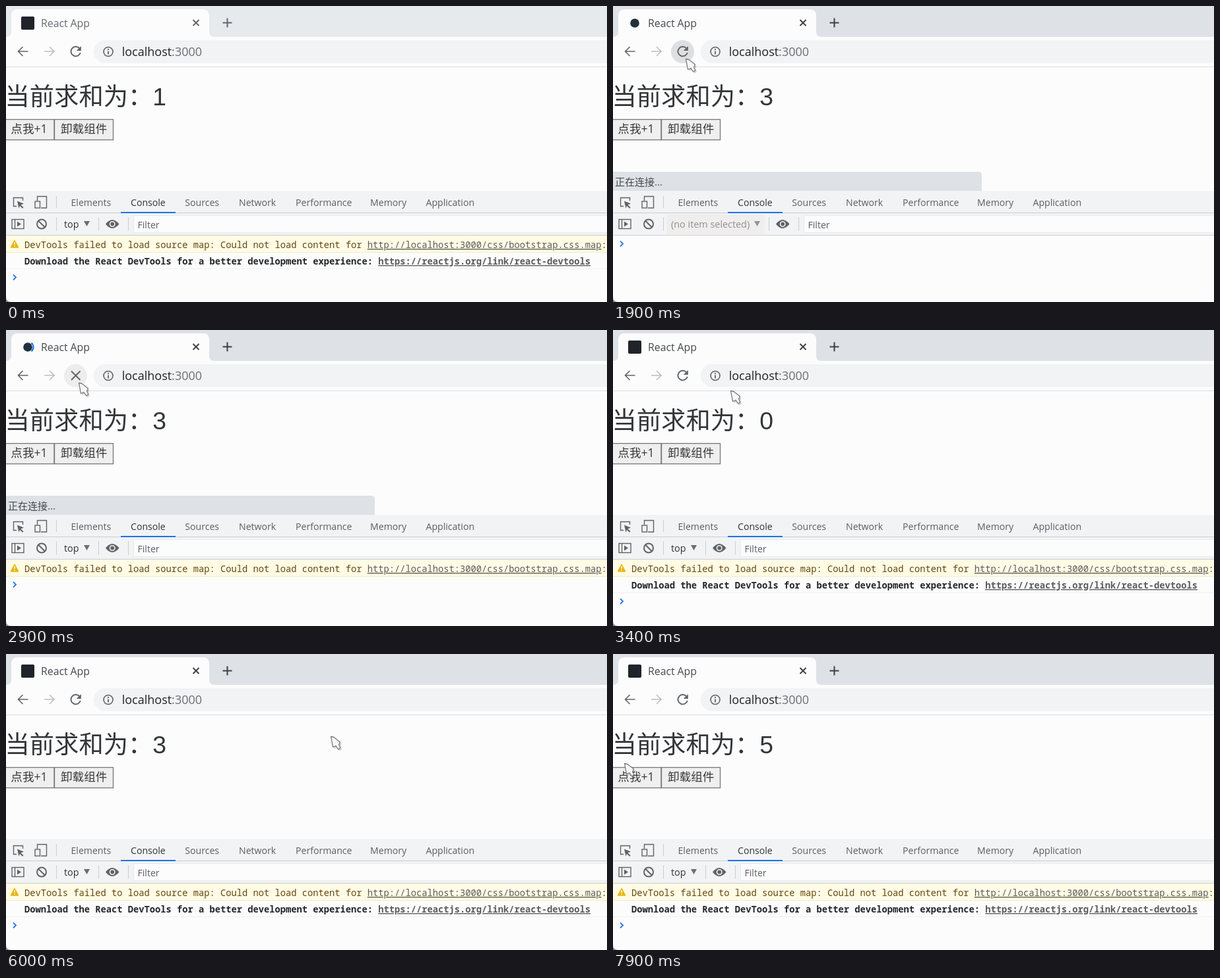
An HTML page for the animation above (8000 ms loop, 911 by 450 pixels).

```html
<!DOCTYPE html>
<html lang="zh">
<head>
<meta charset="utf-8">
<title>React App</title>
<style>
  html, body { margin: 0; width: 100%; height: 100%; overflow: hidden; background: #fcfcfc; }
  svg { display: block; width: 911px; height: 450px; }
  text { font-family: "Open Sans", "Noto Sans", "Noto Sans CJK SC", sans-serif; white-space: pre; }
  .zh { font-family: "Noto Sans CJK SC", "Noto Sans CJK", sans-serif; }
  .sum { font: 37.3px "Liberation Sans", "Noto Sans CJK SC", "Noto Sans CJK", sans-serif; fill: #333639; }
  .btn { fill: #efefef; stroke: #767676; stroke-width: 1.3; }
  .btnText { font-size: 17.6px; fill: #383838; }
  .mono { font: 13.75px "Noto Sans Mono", "DejaVu Sans Mono", monospace; }
  .bold { font-weight: 700; }
  .link { text-decoration: underline 1px; fill: #5c5c5c; }
  .ui { font-size: 14.1px; fill: #5a5e63; }
  .line { fill: none; stroke: #5f6368; stroke-width: 1.6; }
  .sep { stroke: #cbced2; }
</style>
</head>
<body>
<svg viewBox="0 0 911 450">
  <rect width="911" height="450" fill="#fcfcfc"/>

  <!-- tab strip -->
  <rect id="strip" width="911" height="47"/>
  <path d="M0 47Q8 47 8 39V15Q8 5 18 5H298Q308 5 308 15V39Q308 47 316 47Z" fill="#fcfcfc"/>
  <rect id="icon" x="23" y="16" width="20" height="20" rx="2" fill="#20232a"/>
  <g id="busyIcon">
    <circle cx="33" cy="26" r="6.8" fill="#20303c"/>
    <path id="spinner" d="M38.5 19.5A8.5 8.5 0 0 1 38.5 32.5" fill="none" stroke="#1a6fe0" stroke-width="2"/>
  </g>
  <g id="tabInk">
    <text x="53" y="32" font-size="15.8">React App</text>
    <path id="tabMarks" d="M283.5 21l9 9m0-9l-9 9M328.5 25.5h14m-7-7v14" fill="none" stroke-width="2"/>
  </g>

  <!-- address bar -->
  <path d="M0 92.5H911" stroke="#dcdee0"/>
  <g class="line" stroke-width="1.9">
    <path d="M33.5 69H18.5m7-7l-7 7 7 7"/>
    <path d="M58 69H73m-7-7l7 7-7 7" style="stroke:#bbbdc0"/>
  </g>
  <circle id="halo" cx="105.5" cy="69.5" r="17.5"/>
  <g id="reload">
    <path class="line" style="stroke-width:1.9" d="M111 64A7.3 7.3 0 1 0 112.8 71"/>
    <path d="M113.8 61V68H106.8Z" fill="#5f6368"/>
  </g>
  <path id="stop" class="line" style="stroke-width:2" d="M99 62.5l13.5 13.5m0-13.5l-13.5 13.5"/>
  <path d="M911 52H150a17.25 17.25 0 0 0 0 34.5H911Z" fill="#f1f3f4"/>
  <circle class="line" cx="155" cy="69.5" r="7"/>
  <path class="line" style="stroke-width:1.8" d="M155 68.5v5m0-8.5v2"/>
  <text x="175.7" y="76" font-size="18" fill="#202124">localhost<tspan fill="#6b6f74">:3000</tspan></text>

  <!-- page -->
  <text class="sum" x="-1.5" y="150.8">当前求和为：<tspan id="count"></tspan></text>
  <rect class="btn" x="-1" y="172.5" width="74" height="31"/>
  <rect class="btn" x="73.5" y="172.5" width="89" height="31"/>
  <text class="btnText" x="7.3" y="193">点我+1</text>
  <text class="btnText zh" x="83" y="193">卸载组件</text>
  <g id="status">
    <path d="M0 252H554q5 0 5 5V281H0Z" fill="#dee1e6"/>
    <text x="3" y="273" font-size="15" fill="#45494d">正在连接...</text>
  </g>

  <!-- developer tools -->
  <rect y="281" width="911" height="68" fill="#f1f3f4"/>
  <path class="sep" d="M0 314.5H911M0 348.5H911M76.5 289v18M76.5 321v21"/>
  <g id="tabs" class="ui"></g>
  <rect x="174" y="313" width="83" height="2" fill="#1a73e8"/>
  <g class="line" style="stroke-width:1.4">
    <path d="M16 304.5H11.5V291.5H25.5V296"/>
    <path d="M17 296.5l10 4-4.5 1.8 4 4-1.5 1.5-4-4-1.5 4Z" fill="#5f6368" stroke="none"/>
    <path d="M47.5 296V289.5H61.5V307H53"/>
    <rect x="44" y="297" width="7.5" height="10"/>
    <rect x="9" y="324.5" width="18" height="14"/>
    <path d="M13.5 324.5v14"/>
    <path d="M17 327.5l6 4-6 4Z" fill="#5f6368" stroke="none"/>
    <circle cx="54" cy="331.5" r="7" stroke-width="2"/>
    <path d="M49 326.5l10 10" stroke-width="2"/>
  </g>
  <rect id="noItem" x="82" y="317" width="147" height="30" fill="#f0eded"/>
  <text id="context" x="88" y="337" font-size="14.4"></text>
  <path id="caret" d="M0 327h9l-4.5 8Z"/>
  <g id="tools">
    <path class="sep" d="M140.5 321v21M185.5 321v21"/>
    <path d="M151 331.5Q161 318.5 171.5 331.5Q161 344.5 151 331.5Z" fill="#5f6368"/>
    <circle cx="161.2" cy="331.5" r="3.7" fill="#5f6368" stroke="#f1f3f4" stroke-width="1.6"/>
    <rect x="193.5" y="318.5" width="820" height="26" fill="#fcfcfc" stroke="#e9ebed"/>
    <text class="ui" x="199.5" y="338">Filter</text>
  </g>
  <g id="warning">
    <rect y="349" width="911" height="26" fill="#fffbe5"/>
    <path d="M0 374.5H911" stroke="#f5ecc0"/>
    <path d="M13 356.5L18.5 367H7.5Z" fill="#e8b40e" stroke="#e8b40e" stroke-width="1.5" stroke-linejoin="round"/>
    <path d="M13 359v4m0 1.5v1.5" stroke="#fff" stroke-width="1.5"/>
    <text class="mono" x="28" y="368" fill="#64480f">DevTools failed to load source map: Could not load content for <tspan class="link">http://localhost:3000/css/bootstrap.css.map</tspan>:</text>
  </g>
  <g id="notice">
    <path d="M0 399.5H911" stroke="#f0f0f0"/>
    <text class="mono bold" x="28" y="393" fill="#242629">Download the React DevTools for a better development experience: <tspan class="link">https://reactjs.org/link/react-devtools</tspan></text>
  </g>
  <path id="prompt" d="M11 -4l4 4-4 4" fill="none" stroke="#2a79ea" stroke-width="1.9"/>
  <path d="M0 442Q0 450 8 450H0Z" fill="#85888b"/>

  <g id="cursor">
    <path d="M2.5 3L5.5 19 10 17 13.5 22.5 17 20 14.5 15.5 16.5 11.5Z" opacity=".18"/>
    <path d="M.5 .5L3.5 16.5 8 14.5 11.5 20 15 17.5 12.5 13 14.5 9 5 1.5Z" fill="#f7f7f7" stroke="#77797b" stroke-width="1.3" stroke-linejoin="round"/>
  </g>
</svg>
<script>
const LOOP = 8000, STEP = 100;
const $ = id => document.getElementById(id);
const show = (id, on) => $(id).setAttribute('visibility', on ? 'visible' : 'hidden');
const set = (id, attrs) => { for (const k in attrs) $(id).setAttribute(k, attrs[k]); };

$('tabs').innerHTML = [
  ['Elements', 98.5], ['Console', 189], ['Sources', 271.3], ['Network', 353],
  ['Performance', 439], ['Memory', 552], ['Application', 636.5]
].map(([name, x]) =>
  `<text x="${x}" y="304"${name === 'Console' ? ' fill="#303336"' : ''}>${name}</text>`).join('');

// Pointer trail: time, x, y
const trail = [
  [700, 886, 13], [800, 690, 25], [900, 455, 37], [1000, 412, 42], [1100, 293, 83],
  [1200, 165, 94], [1300, 145, 95], [1400, 135, 90], [1500, 126, 87], [1700, 110, 80],
  [3300, 110, 80], [3400, 178, 92], [3500, 242, 102], [3600, 425, 114], [3700, 492, 125],
  [7200, 492, 125], [7300, 487, 126], [7400, 467, 126], [7500, 402, 127],
  [7600, 312, 125], [7700, 207, 113], [7800, 60, 150], [7900, 17, 166]
];

// The page counts up every TICK and starts again at 0 when it has reloaded
const TICK = 900, RELOADED = 3300, CLEARED = 1800;
const countAt = t => t < RELOADED
  ? 1 + Math.floor(Math.min(t, CLEARED) / TICK)
  : Math.floor((t - RELOADED) / TICK);

function pointerAt(t) {
  const i = trail.findIndex(p => p[0] >= t);
  if (i < 1) return i ? trail[trail.length - 1].slice(1) : trail[0].slice(1);
  const [t0, x0, y0] = trail[i - 1], [t1, x1, y1] = trail[i];
  const k = (t - t0) / (t1 - t0);
  return [x0 + (x1 - x0) * k, y0 + (y1 - y0) * k];
}

function update(t) {
  const within = (a, b) => t >= a && t < b;
  const focused = t >= CLEARED;

  $('count').textContent = countAt(t);

  show('cursor', t >= 700);
  set('cursor', { transform: `translate(${pointerAt(t)})` });

  set('strip', { fill: focused ? '#dee1e6' : '#e7eaed' });
  set('tabInk', { fill: focused ? '#45494d' : '#666a6e' });
  set('tabMarks', { stroke: focused ? '#3c4043' : '#63676b' });

  const loading = within(1900, 3400);
  show('icon', !loading);
  show('busyIcon', loading);
  show('spinner', within(2300, 3400));
  show('status', within(1900, 3400));

  const stopping = within(2300, RELOADED);
  show('halo', within(1600, 3400));
  set('halo', { fill: within(CLEARED, 2300) ? '#dedfe0' : '#ededee' });
  show('reload', !stopping);
  show('stop', stopping);

  const empty = within(1900, 2600);
  show('noItem', empty);
  $('context').textContent = empty ? '(no item selected)' : 'top';
  set('context', { fill: empty ? '#8f9194' : '#303336' });
  set('caret', { transform: `translate(${empty ? 214 : 118})`, fill: empty ? '#929497' : '#6b6e72' });
  set('tools', { transform: `translate(${empty ? 96 : 0})` });

  const warned = !empty, noticed = !within(1900, RELOADED);
  show('warning', warned);
  show('notice', noticed);
  set('prompt', { transform: `translate(0 ${361.5 + 25.5 * (warned + noticed)})` });
}

const start = performance.now();
function frame() {
  const t = (performance.now() - start) % LOOP;
  update(Math.floor(t / STEP) * STEP);
  requestAnimationFrame(frame);
}
frame();
</script>
</body>
</html>
```
